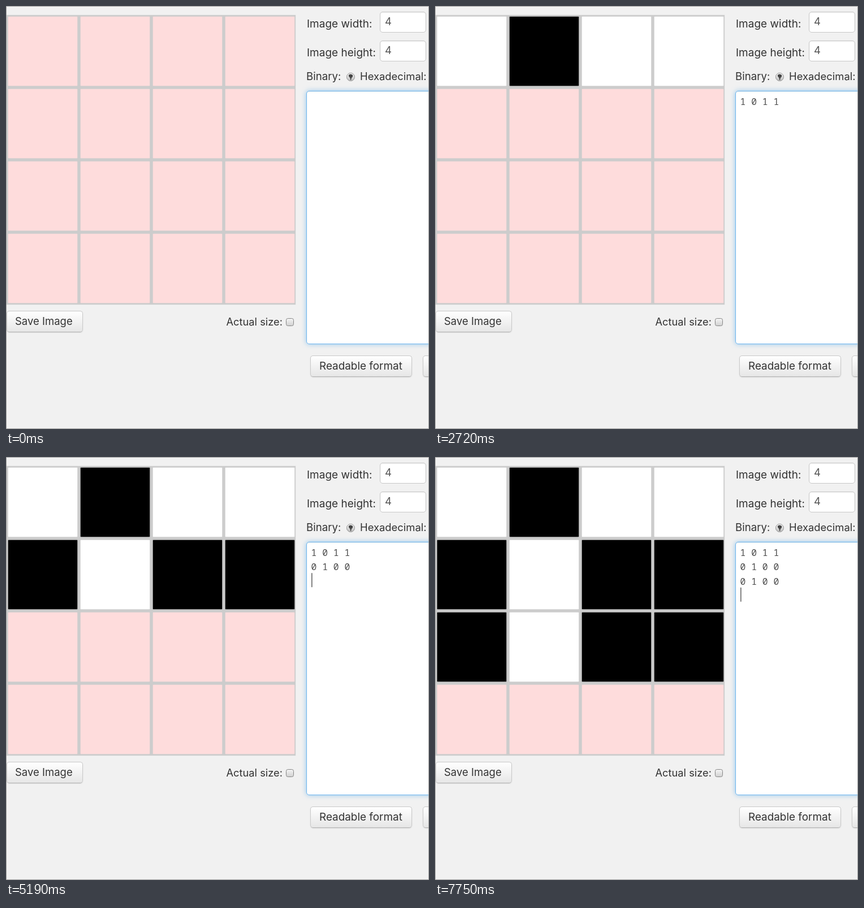
Recreate the animation shown at these times as an HTML page. Size 748x748 px, loop 8000 ms.

```html
<!DOCTYPE html>
<html lang="en">
<head>
<meta charset="utf-8">
<title>Binary image editor</title>
<style>
  html, body { margin: 0; width: 100%; height: 100%; overflow: hidden; background: #f1f1f1; }
  #stage { position: relative; width: 748px; height: 748px; overflow: hidden; }
  #stage > * { position: absolute; box-sizing: border-box; }
  #frame { inset: 0; border: 1px solid #979797; }
  #grid { left: 0; top: 16px; width: 512px; height: 512px; background: #ccc; box-shadow: 0 0 1px #ccc; }
  #grid i { position: absolute; width: 121.5px; height: 121.5px; }
  .field { background: #fff; border: 1px solid #c8c8c8; border-radius: 5px; box-shadow: inset 0 1px 2px rgba(0,0,0,.08); }
  .area { border-color: #6db5ee; box-shadow: inset 0 1px 2px rgba(0,0,0,.08), 0 0 9px rgba(82,168,236,.6); }
  .button { background: linear-gradient(#fff, #e6e6e6); border: 1px solid #c9c9c9; border-bottom-color: #b0b0b0;
    border-radius: 5px; box-shadow: 0 1px 2px rgba(0,0,0,.08); }
  .check { background: linear-gradient(#f4f4f4, #d2d2d2); border: 1.5px solid #858585; border-radius: 3.5px; }
  .radio { background: linear-gradient(#fafafa, #bcbcbc); border: 1px solid #919191; border-radius: 50%; }
  svg { left: 0; top: 0; }
  text { font: 18.6px Inter, sans-serif; fill: #333; white-space: pre; }
  text.value { fill: #555; }
  text.code { font: 16.35px "Noto Sans Mono", monospace; fill: #4c4c4c; }
</style>
</head>
<body>
<div id="stage">
  <div id="grid"></div>
  <svg id="labels" width="748" height="748" style="z-index:1">
    <path d="M606 122q3-3 7 0q1 3-2 5l-1 4h-1l-.5-4q-3-2-2.500-5z" fill="#444"/>
    <rect id="caret" width="1.2" fill="#333"/>
  </svg>
  <div id="frame" style="z-index:2"></div>
</div>
<script>
const stage = document.getElementById('stage');
const grid = document.getElementById('grid');
const labels = document.getElementById('labels');
const caret = document.getElementById('caret');

function box(kind, x, y, w, h) {
  const el = document.createElement('div');
  el.className = kind;
  el.style.cssText = `left:${x}px;top:${y}px;width:${w}px;height:${h}px`;
  stage.append(el);
}

function label(string, x, y, size, kind = '') {
  const el = document.createElementNS('http://www.w3.org/2000/svg', 'text');
  el.setAttribute('x', x);
  el.setAttribute('y', y);
  el.setAttribute('class', kind);
  if (size) el.style.fontSize = size + 'px';
  el.textContent = string;
  labels.append(el);
  return el;
}

box('field', 661, 10, 82, 37);
box('field', 661, 61, 82, 37);
box('field area', 531, 150, 240, 448);
box('button', 1, 539, 135, 38);
box('button', 538, 618, 180, 38);
box('button', 737, 618, 60, 38);
box('check', 495, 552, 14, 14);
box('radio', 602, 118, 15, 15);

label('Image width:', 532, 38, 19);
label('Image height:', 532, 89, 19);
label('Binary:', 531, 131, 18.7);
label('Hexadecimal:', 626, 131, 18.4);
label('Save Image', 16, 564, 18.5);
label('Actual size:', 389.5, 565, 18.3);
label('Readable format', 554, 643, 18.9);
label('4', 670, 34, 18.6, 'value');
label('4', 670, 85, 18.6, 'value');

const cells = Array.from({ length: 16 }, (_, i) => {
  const cell = document.createElement('i');
  cell.style.left = 4.2 + i % 4 * 128 + 'px';
  cell.style.top = 3.2 + (i >> 2) * 128 + 'px';
  grid.append(cell);
  return cell;
});
const rows = [0, 1, 2].map(i => label('', 539.6, 174.7 + i * 25.5, 0, 'code'));

const script = '1 0 1 1\n0 1 0 0\n0 1 0 0\n';
const keyTimes = [
  740, 890, 1170, 1420, 1850, 1980, 2260, 2870,
  3310, 3610, 3730, 4020, 4290, 4600, 4880, 5190,
  6030, 6180, 6490, 6610, 6890, 7160, 7450, 7750
];
const caretOff = [[0, 430], [2720, 2870], [5750, 6030]];
const colours = { 0: '#000', 1: '#fff' };

function draw(now) {
  const t = now % 8000;
  const typed = script.slice(0, keyTimes.filter(k => k <= t).length);
  const lines = typed.split('\n');
  const bits = typed.replace(/\s/g, '');

  rows.forEach((row, i) => row.textContent = lines[i] || '');
  cells.forEach((cell, i) => {
    const colour = colours[bits[i]] || '#fedcdc';
    cell.style.background = colour;
    cell.style.boxShadow = `0 0 1.5px ${colour}`;
  });

  const line = lines.length - 1;
  caret.setAttribute('x', 540.3 + lines[line].length * 9.81);
  caret.setAttribute('y', line ? 154 + line * 25.6 : 158);
  caret.setAttribute('height', line ? 25 : 21);
  caret.style.opacity = caretOff.some(([a, b]) => t >= a && t < b) ? 0 : 1;
  requestAnimationFrame(draw);
}
draw(performance.now());
</script>
</body>
</html>
```
